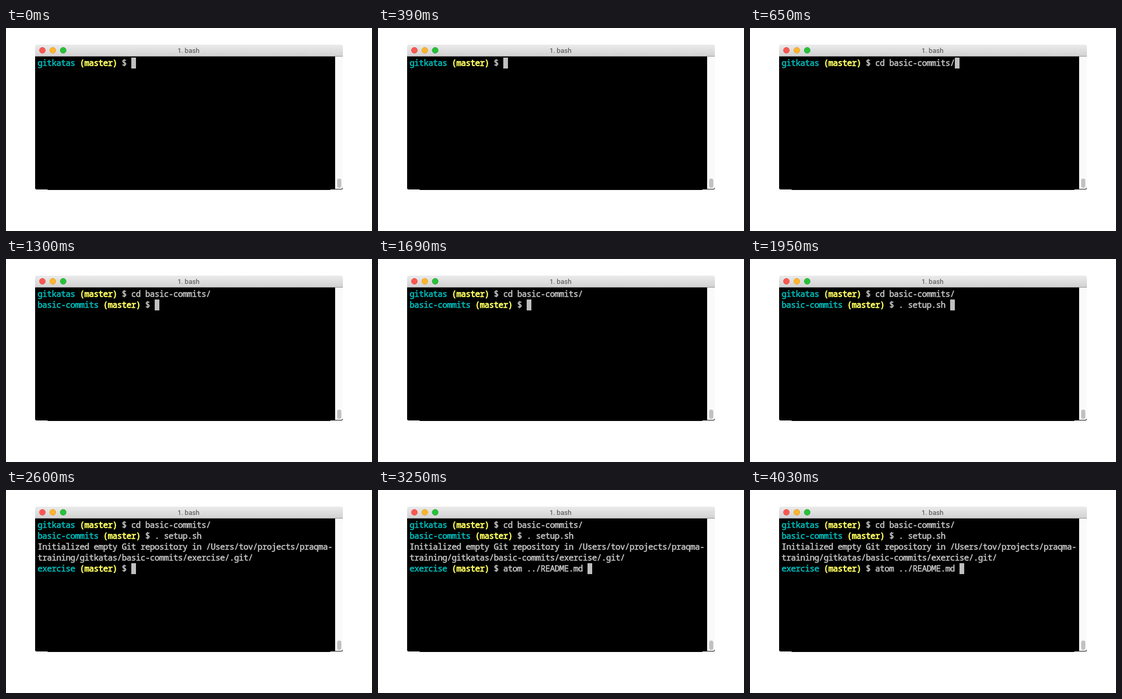
Animation, 704 px wide and 391 px high, one loop 4.55 s. Source, as an HTML page with a canvas:

```html
<!DOCTYPE html>
<html lang="en">
<head>
<meta charset="utf-8">
<title>Terminal</title>
<style>
html, body { margin: 0; width: 100%; height: 100%; overflow: hidden; background: #fff; }
canvas { display: block; }
</style>
</head>
<body>
<canvas id="stage" width="704" height="391"></canvas>
<script>
const ctx = document.getElementById('stage').getContext('2d');
const STEP = 650, LOOP = 4550;
const LEFT = 61, TOP = 57, CHAR = 9, LINE = 21;
const MONO = '16px "Noto Sans Mono", "DejaVu Sans Mono", monospace';
const TEAL = '#00b9b9', YELLOW = '#ffff60', GRAY = '#c3c3c3';

// Each part is text, colour and the extra stroke that thickens it.
const prompt = (dir, command = '') => [
  [dir, TEAL, 0.7],
  [' (master)', YELLOW, 0.9],
  [' $ ' + command, GRAY, 0.6]
];
const output = text => [[text, GRAY, 0.6]];

const cd = prompt('gitkatas', 'cd basic-commits/');
const setup = prompt('basic-commits', '. setup.sh ');
const done = [
  cd, setup,
  output('Initialized empty Git repository in /Users/tov/projects/praqma-'),
  output('training/gitkatas/basic-commits/exercise/.git/')
];
const screens = [
  [prompt('gitkatas')],
  [cd],
  [cd, prompt('basic-commits')],
  [cd, setup],
  [...done, prompt('exercise')],
  [...done, prompt('exercise', 'atom ../README.md ')]
];

function rect(x, y, w, h, fill, radius = 0) {
  ctx.fillStyle = fill;
  ctx.beginPath();
  ctx.roundRect(x, y, w, h, radius);
  ctx.fill();
}

function light(x, fill, edge) {
  ctx.beginPath();
  ctx.arc(x, 43, 5.7, 0, Math.PI * 2);
  ctx.fillStyle = fill;
  ctx.fill();
  ctx.strokeStyle = edge;
  ctx.lineWidth = 0.8;
  ctx.stroke();
}

function drawWindow() {
  rect(0, 0, 704, 391, '#fff');
  const bar = ctx.createLinearGradient(0, 32, 0, 54);
  bar.addColorStop(0, '#ebebeb');
  bar.addColorStop(1, '#d2d2d2');
  rect(56, 32, 592, 23, bar, [4, 4, 0, 0]);
  rect(56, 54, 592, 1, '#909090');
  light(70, '#fc5750', '#df4640');
  light(90, '#fdb52b', '#dd9a22');
  light(110, '#27c138', '#1ca52b');

  ctx.font = '13px Roboto, Inter, sans-serif';
  ctx.letterSpacing = '0px';
  ctx.textAlign = 'center';
  ctx.fillStyle = '#464646';
  ctx.fillText('1. bash', 351, 48);

  rect(56, 55, 592, 256, '#000', [0, 0, 3, 3]);
  rect(80, 310, 544, 2, '#000');
  rect(633, 55, 15, 255, '#fafafa', [0, 0, 4, 0]);
  rect(633, 55, 1, 255, '#e6e6e6');
  rect(637, 290, 8, 18, '#c1c1c1', 4);
}

function drawLine(parts, row) {
  let col = 0;
  ctx.font = MONO;
  ctx.letterSpacing = '0px';
  const gap = CHAR - ctx.measureText('m').width;
  ctx.letterSpacing = gap + 'px';
  ctx.textAlign = 'left';
  ctx.lineJoin = 'round';
  for (const [text, color, bold] of parts) {
    const x = LEFT + col * CHAR + gap / 2, y = TOP + row * LINE + 16;
    ctx.fillStyle = ctx.strokeStyle = color;
    ctx.lineWidth = bold;
    ctx.fillText(text, x, y);
    ctx.strokeText(text, x, y);
    col += text.length;
  }
  return col;
}

function draw(now) {
  const index = Math.min(Math.floor(now % LOOP / STEP), screens.length - 1);
  const lines = screens[index];
  drawWindow();
  let col = 0;
  lines.forEach((parts, row) => { col = drawLine(parts, row); });
  rect(LEFT + col * CHAR, TOP + (lines.length - 1) * LINE, CHAR, LINE, '#c0c0c0');
}

let start;
function tick(now) {
  start ??= now;
  draw(now - start);
  requestAnimationFrame(tick);
}
draw(0);
requestAnimationFrame(tick);
</script>
</body>
</html>
```
